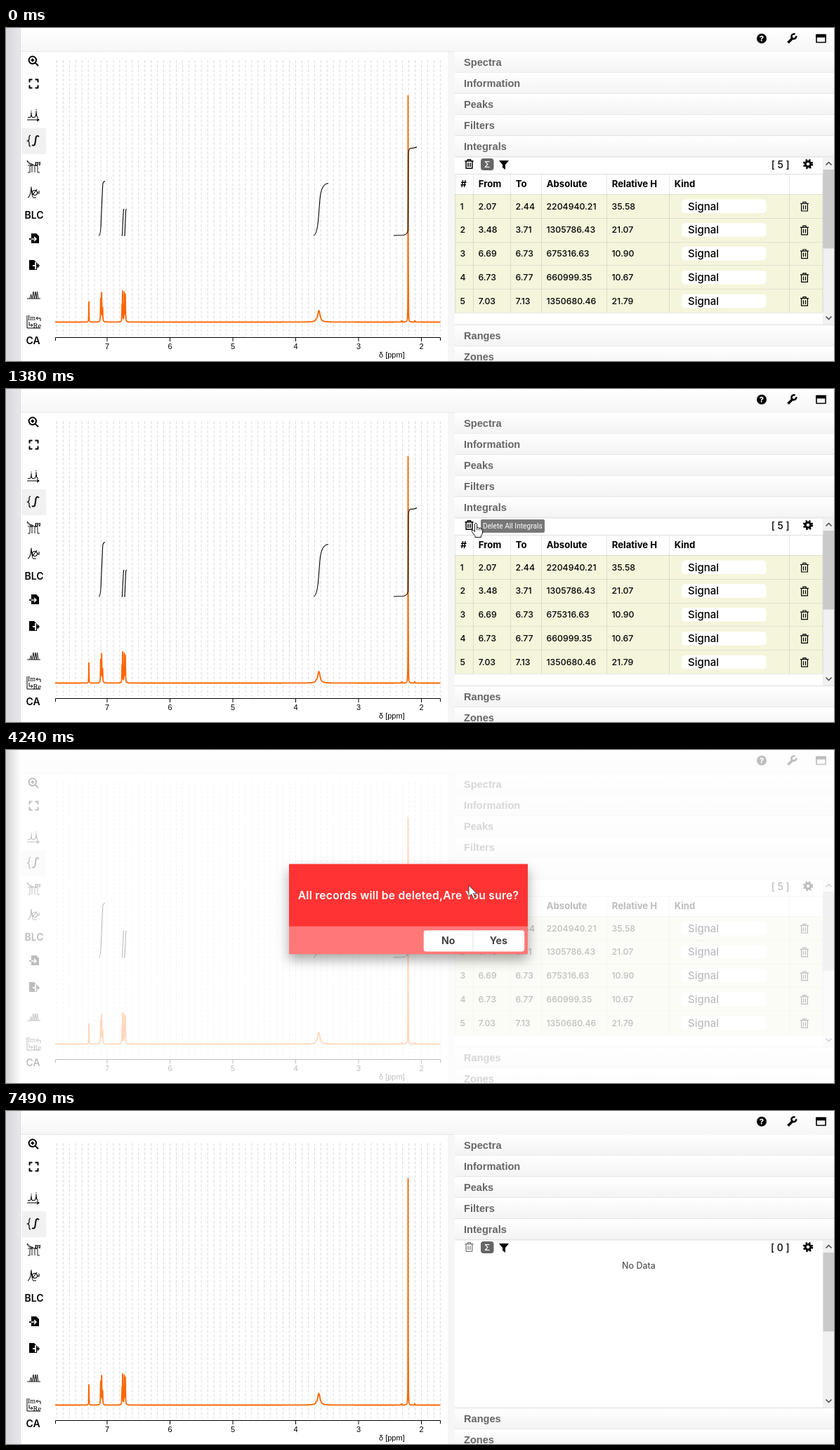
Animation, 1179 px wide and 475 px high, one loop 8.12 s. Source, as an HTML page with a canvas:

```html
<!DOCTYPE html>
<html lang="en">
<head>
<meta charset="utf-8">
<title>Delete all integrals</title>
<style>
html, body { margin: 0; width: 100%; height: 100%; overflow: hidden; background: #fff; }
canvas { display: block; }
</style>
</head>
<body>
<canvas id="stage" width="1179" height="475"></canvas>
<script>
const c = document.getElementById('stage').getContext('2d');
const LOOP = 8120, STEP = 77.5;
const SANS = 'Inter, sans-serif', ARIAL = '"Liberation Sans", Arial, sans-serif', SERIF = '"Liberation Serif", serif';
const ORANGE = '#ff6600';

// from, to, absolute, relative
const rows = [
  ['2.07', '2.44', '2204940.21', '35.58'],
  ['3.48', '3.71', '1305786.43', '21.07'],
  ['6.69', '6.73', '675316.63', '10.90'],
  ['6.73', '6.77', '660999.35', '10.67'],
  ['7.03', '7.13', '1350680.46', '21.79']
];
const columns = [640, 665.5, 718.5, 762.5, 855.5, 944.5, 1115.5, 1163];
const rowTop = i => 237 + i * 33.8;
const ppmX = p => 144 + (7 - p) * 89.5;

// time, x, y of the pointer
const pointerKeys = [
  [285, 700, 466], [827, 778, 302], [1060, 819, 225], [1368, 669, 191], [1835, 659, 194],
  [4470, 659, 193], [5242, 700, 273], [6873, 700, 273], [7490, 1068, 478]
];

// centre, height, half width
const peaks = [
  [118, 29, .25], [134.8, 32, .3], [136.2, 40, .3], [137.6, 19, .3],
  [165.2, 22, .25], [166, 42, .25], [168.4, 41, .3], [169.9, 38, .3],
  [441.5, 1.5, .6], [445.5, 16.5, 2], [563.5, 2, .3], [572.5, 315, .12], [572.9, 40, .2], [582, 2, .3]
];
const spectrum = new Path2D();
for (let x = 70; x <= 618.5; x += .1) {
  const rise = peaks.reduce((sum, [p, h, w]) => sum + h / (1 + ((x - p) / w) ** 2), 0);
  spectrum.lineTo(x, 419.5 - rise);
}
const integralCurves = new Path2D(
  'M552 296L566 295.5Q572 294.5 572.4 288L573 180Q573.2 172 576 171.5Q582 171.5 585 169.5' +
  'M438 296Q443 295 445 270L447 244Q449 222 459 221.5' +
  'M164.5 296h1L167.3 260l.8-2M168 296h1L170.6 260l.8-2' +
  'M132 296Q135 296 135.4 275L137.7 224Q138 219 141 218.5');

function text(s, x, y, size, { weight = 500, family = SANS, color = '#000', align = 'left', spacing = 0, style = '' } = {}) {
  c.font = `${style} ${weight} ${size}px ${family}`;
  c.fillStyle = color;
  c.textAlign = align;
  c.letterSpacing = spacing + 'px';
  c.fillText(s, x, y + size * .36);
}
function box(x, y, w, h, fill, radius = 0) {
  c.fillStyle = fill;
  c.beginPath();
  c.roundRect(x, y, w, h, radius);
  c.fill();
}
function line(x1, y1, x2, y2, color, width = 1) {
  c.strokeStyle = color;
  c.lineWidth = width;
  c.beginPath();
  c.moveTo(x1, y1);
  c.lineTo(x2, y2);
  c.stroke();
}
function disc(x, y, r, fill) {
  c.fillStyle = fill;
  c.beginPath();
  c.arc(x, y, r, 0, 7);
  c.fill();
}
function icon(x, y, d, { fill, stroke = fill ? null : '#000', width = 1 } = {}) {
  const path = new Path2D(d);
  c.save();
  c.translate(x, y);
  c.lineJoin = 'round';
  if (fill) { c.fillStyle = fill; c.fill(path); }
  if (stroke) { c.strokeStyle = stroke; c.lineWidth = width; c.stroke(path); }
  c.restore();
}
function gradient(x1, y1, x2, y2, from, to) {
  const g = c.createLinearGradient(x1, y1, x2, y2);
  g.addColorStop(0, from);
  g.addColorStop(1, to);
  return g;
}
const trash = (x, y, color, width) =>
  icon(x, y, 'M-6-4.2H6M-2.2-4.2V-6.3H2.2V-4.2M-4.4-4.2V6.3H4.4V-4.2M-1.5-1.7V4M1.5-1.7V4', { stroke: color, width });

function drawFrame() {
  box(0, 0, 1179, 475, '#fff');
  box(21, 0, 1158, 33, gradient(0, 0, 0, 33, '#fff', '#f6f6f6'));
  line(21, 33.5, 1179, 33.5, '#e8e8e8');
  box(629, 34, 10, 441, '#f6f6f6');

  disc(1076, 15, 7, '#000');
  text('?', 1076, 15.3, 11, { weight: 800, color: '#fff', align: 'center' });
  icon(1119, 15, 'M-5.5 6L1.5-1', { width: 3.6 });
  icon(1119, 15, 'M4.5-6A3.4 3.4 0 1 0 6.2-3.6', { width: 2.6 });
  icon(1160.5, 15, 'M-6.5-5.5H6.5V5.5H-6.5Z', { width: 1.6 });
  box(1153, 9, 15, 4.5, '#000', 1);
}

function drawSidebar() {
  box(22, 143, 35, 37, '#f1f1f1');
  icon(39, 47, 'M4-1.2A5.2 5.2 0 1 1-6.4-1.2A5.2 5.2 0 1 1 4-1.2M2.6 2.6L7 7M-3.6-1.2H1.2M-1.2-3.6V1.2', { width: 2 });
  icon(39.5, 79.5, 'M-6-2V-6H-2M2-6H6V-2M6 2V6H2M-2 6H-6V2', { width: 2 });
  icon(39, 125, 'M-9 6H8l-3-2m3 2l-3 2M-8 2.5h3q2 0 2-7q0 7 2 7h2q3 0 3-9q0 9 3 9M-3-7v1M4-9v1', { width: 1.1 });
  icon(38, 161, 'M-3-8q-2 0-2 3v2q0 3-3 3q3 0 3 3v2q0 3 2 3', { width: 1.2 });
  icon(41, 161, 'M6-6q-4-3-4.5 2L.5 3q-.7 5-4.5 3', { width: 1.9 });
  icon(39, 198, 'M-9-9q4 5 9 6M-9-9q1 6 9 6M-8 8h3V0q0-2 2-2h1v10M2 8V-2h2q2 0 2 2v8h3M-8-2h14', { width: .9 });
  text('m', 41, 192, 11, { family: SERIF, style: 'italic', weight: 700 });
  icon(39, 235, 'M-8 7q4-1 5-15q1 15 3 15h4M5.5 0A3.5 3.5 0 1 1-1.5 0A3.5 3.5 0 1 1 5.5 0M-1 3L5-5M8-3v4l-2-1', { width: 1.1 });
  text('BLC', 26.5, 267, 14, { weight: 600 });
  const sheet = 'M-5-7H2L6-3V7H-5Z';
  icon(41, 300, sheet, { fill: '#000' });
  icon(41, 300, 'M-8 1H-5', { width: 2 });
  icon(41, 300, 'M-5 1H2M-1-2L2 1L-1 4', { stroke: '#fff', width: 1.6 });
  icon(38, 338, sheet, { fill: '#000' });
  icon(38, 338, 'M0 1H6M4-4V6', { stroke: '#fff', width: 2 });
  icon(38, 338, 'M5 0H6.5V-3L10 1L6.5 5V2H5Z', { fill: '#000' });
  icon(39, 381, 'M-9 5H10M-5 5L-3.5-1L-2 5L0-5L1.2 5L3-5L4.2 5L5.6-5L6.8 5', { width: .9 });
  icon(39, 419, 'M-9-9V9H10M4-5h6v4M6-7l-2 2l2 2M-6 0V5H-1l-2-2m2 2l-2 2');
  text('Im', 31, 413, 10, { family: SERIF });
  text('Re', 38.5, 424, 10.5, { family: SERIF });
  text('CA', 28.5, 446, 14, { weight: 600 });
}

function drawSpectrum(hovered, hasIntegrals) {
  c.setLineDash([4, 2.5]);
  for (let p = 7.8; p > 1.65; p -= .1) line(ppmX(p), 46, ppmX(p), 438, '#d9d9d9');
  c.setLineDash([]);

  c.strokeStyle = ORANGE;
  c.lineWidth = 1.8;
  c.lineJoin = 'round';
  c.stroke(spectrum);
  if (hasIntegrals) {
    c.strokeStyle = '#000';
    c.lineWidth = 1.1;
    c.stroke(integralCurves);
  }

  icon(0, 0, 'M70.5 446V441.5H618.5V446');
  for (let p = 2; p <= 7; p++) {
    line(ppmX(p), 441, ppmX(p), 447, '#000');
    text(p, ppmX(p), 454, 11, { family: ARIAL, weight: 400, align: 'center' });
  }
  text('δ [ppm]', 531, 466, 11, { family: ARIAL, weight: 400 });

  if (hovered >= 0) {
    const [from, to, , relative] = rows[hovered];
    const left = ppmX(to);
    box(left, 33, ppmX(from) - left, 408, 'rgba(255,102,0,.4)');
    box(left - 21, 420, 16, 17, '#c8101e', 4);
    box(left - 15.5, 428, 5, 1.6, '#fff');
    text(relative, left - .5, 467.5, 12.8, { weight: 700 });
  }
}

function accordion(title, y, height = 30) {
  box(639, y, 540, height, gradient(0, y, 0, y + 30, '#fff', '#f3f3f3'));
  line(639, y + 30, 1179, y + 30, '#dcdcdc');
  text(title, 652, y + 15, 14.6, { family: ARIAL, weight: 700, color: '#666' });
}

function drawPanel(hovered, hasIntegrals) {
  ['Spectra', 'Information', 'Peaks', 'Filters', 'Integrals'].forEach((s, i) => accordion(s, 33.5 + i * 30.1));
  line(639, 423.5, 1179, 423.5, '#dcdcdc');
  accordion('Ranges', 424);
  accordion('Zones', 454);

  trash(659.5, 194, hasIntegrals ? '#000' : '#555', hasIntegrals ? 1.5 : 1);
  box(676, 186, 18.5, 17, '#666', 4);
  text('Σ', 685.2, 195, 12, { color: '#fff', align: 'center' });
  icon(709, 195, 'M-7-6H7L2 0V7L-2 4V0Z', { fill: '#000' });
  text(`[ ${hasIntegrals ? 5 : 0} ]`, 1115.5, 195, 13.8, { align: 'right' });
  c.setLineDash([2.36, 2.36]);
  icon(1142, 194, 'M5.9 0A5.9 5.9 0 1 1-5.9 0A5.9 5.9 0 1 1 5.9 0', { width: 2.6 });
  c.setLineDash([]);
  icon(1142, 194, 'M3.8 0A3.8 3.8 0 1 1-3.8 0A3.8 3.8 0 1 1 3.8 0', { width: 3 });

  box(1163, 185, 16, 238, '#f1f1f1');
  box(1163.5, 202, 15.5, 112.5, '#cacaca');
  icon(1171.5, 193, 'M-4 2.5L0-1.5L4 2.5', { stroke: '#505050', width: 1.7 });
  icon(1171.5, 414, 'M-4-2.5L0 1.5L4-2.5', { stroke: '#505050', width: 1.7 });

  if (hasIntegrals) drawTable(hovered);
  else text('No Data', 901, 220, 12.5, { color: '#555', align: 'center' });
}

function drawTable(hovered) {
  rows.forEach((row, i) => box(639, rowTop(i), 524, 33.8, i === hovered ? '#ffcba6' : '#f5f5dc'));
  for (const x of columns) line(x, 208, x, 406, 'rgba(0,0,0,.1)');
  for (let i = 0; i < 6; i++) {
    const y = Math.round(rowTop(i)) + .5;
    line(639, y, 1163, y, 'rgba(0,0,0,.09)');
  }
  line(639, 208.5, 1163, 208.5, '#dedede');

  ['#', 'From', 'To', 'Absolute', 'Relative H', 'Kind'].forEach((s, i) =>
    text(s, columns[i] + 7.2, 222.5, 13.2, { weight: 700 }));
  rows.forEach((row, i) => {
    const y = rowTop(i) + 17.2;
    [i + 1, ...row].forEach((s, j) => text(s, columns[j] + (j ? 7 : 6.5), y, 12.3));
    box(962, y - 9.7, 120.5, 19.5, '#fff', 5);
    text('Signal', 971, y, 15);
    trash(1137, y + .5, '#000', 1.2);
  });
}

function drawDialog(t, yesHovered) {
  const stage = Math.min(3, Math.floor((t - 4082) / 76.5));
  const scale = [.6, .83, .944, 1][stage];
  c.save();
  c.globalAlpha = [.35, .75, 1, 1][stage];
  c.translate(573, 227);
  c.scale(scale, scale);
  c.shadowColor = 'rgba(0,0,0,.35)';
  c.shadowBlur = 16;
  c.shadowOffsetY = 8;
  box(-180, -68, 360, 136, '#f77');
  c.shadowColor = 'transparent';
  box(-180, -68, 360, 94, '#f33');
  text('All records will be deleted,Are You sure?', 0, -20.5, 16.5, { weight: 600, color: '#fff', align: 'center', spacing: .3 });
  box(23, 32, 152, 32, '#fff', 4);
  if (yesHovered) box(97, 32, 78, 32, gradient(0, 32, 0, 64, '#fff', '#e4e4e4'), [0, 4, 4, 0]);
  line(97.5, 32, 97.5, 64, '#ddd');
  text('No', 60, 47.5, 15, { weight: 700, color: '#444', align: 'center' });
  text('Yes', 136, 47.5, 15, { weight: 700, color: '#444', align: 'center' });
  c.restore();
}

function pointerAt(t) {
  const q = 285 + Math.floor((t - 277) / STEP) * STEP;
  const i = pointerKeys.findIndex(k => k[0] >= q);
  if (i < 1) return pointerKeys[i < 0 ? pointerKeys.length - 1 : 0].slice(1);
  const [t0, x0, y0] = pointerKeys[i - 1], [t1, x1, y1] = pointerKeys[i];
  const f = (q - t0) / (t1 - t0);
  return [x0 + (x1 - x0) * f, y0 + (y1 - y0) * f];
}

function drawPointer(x, y, hand) {
  const shape = hand
    ? 'M-1.5 1.5Q0-1.5 1.7 1.5V7Q3.5 5.5 4.7 7.5Q6.5 6.3 7.5 8.3Q9.5 7.8 9.6 10V14Q9 17 7.5 18V20.5H-1V18.5L-5.5 12.5Q-6.5 10-4 10.2L-1.5 12.5Z'
    : 'M0 0V16L3.7 12.6L6.4 18.6L9 17.4L6.3 11.6H11.3Z';
  icon(x, y, shape, { fill: '#fff', stroke: hand ? '#111' : '#444', width: 1 });
  if (hand) icon(x, y, 'M1.7 7V10.5M4.7 7.5V10.5M7.5 8.3V10.5', { stroke: '#111', width: .9 });
}

function draw(t) {
  const modal = t >= 3770 && t < 6570;
  const hasIntegrals = t < 6570;
  const visible = t >= 280 && t < 7490;
  const [x, y] = pointerAt(t);
  const row = Math.floor((y + 4 - 237) / 33.8);
  const hovered = visible && t < 1060 && row >= 0 && row < 5 ? row : -1;

  drawFrame();
  drawSidebar();
  drawSpectrum(hovered, hasIntegrals);
  drawPanel(hovered, hasIntegrals);
  if (modal) box(20, 0, 1159, 475, 'rgba(255,255,255,.74)');
  box(0, 0, 21, 475, modal ? gradient(0, 0, 20, 0, '#d4d4d6', '#fcfcfc') : gradient(0, 0, 20, 0, '#d6d6da', '#e7e7ec'));
  if (!modal) line(20.5, 0, 20.5, 475, '#dadade');

  const overButton = modal && y > 259;
  if (modal && t >= 4090) drawDialog(t, overButton);
  if (t >= 1380 && t < 3770) {
    box(676, 186, 91, 19, '#777', 2);
    text('Delete All Integrals', 679, 195.5, 10.2, { family: 'Roboto, sans-serif', weight: 400, color: '#fff' });
  }
  if (t >= 2610 && t < 3770) disc(659, 192.5, 13, `rgba(255,235,20,${t < 2680 ? .35 : .7})`);
  if (t >= 6020 && t < 6420) disc(700, 272.5, 13, 'rgba(255,235,20,.7)');
  if (visible) drawPointer(x, y, overButton || (t < 3770 && x < 675 && y < 207));
}

function tick() {
  draw(performance.now() % LOOP);
  requestAnimationFrame(tick);
}
tick();
</script>
</body>
</html>
```
